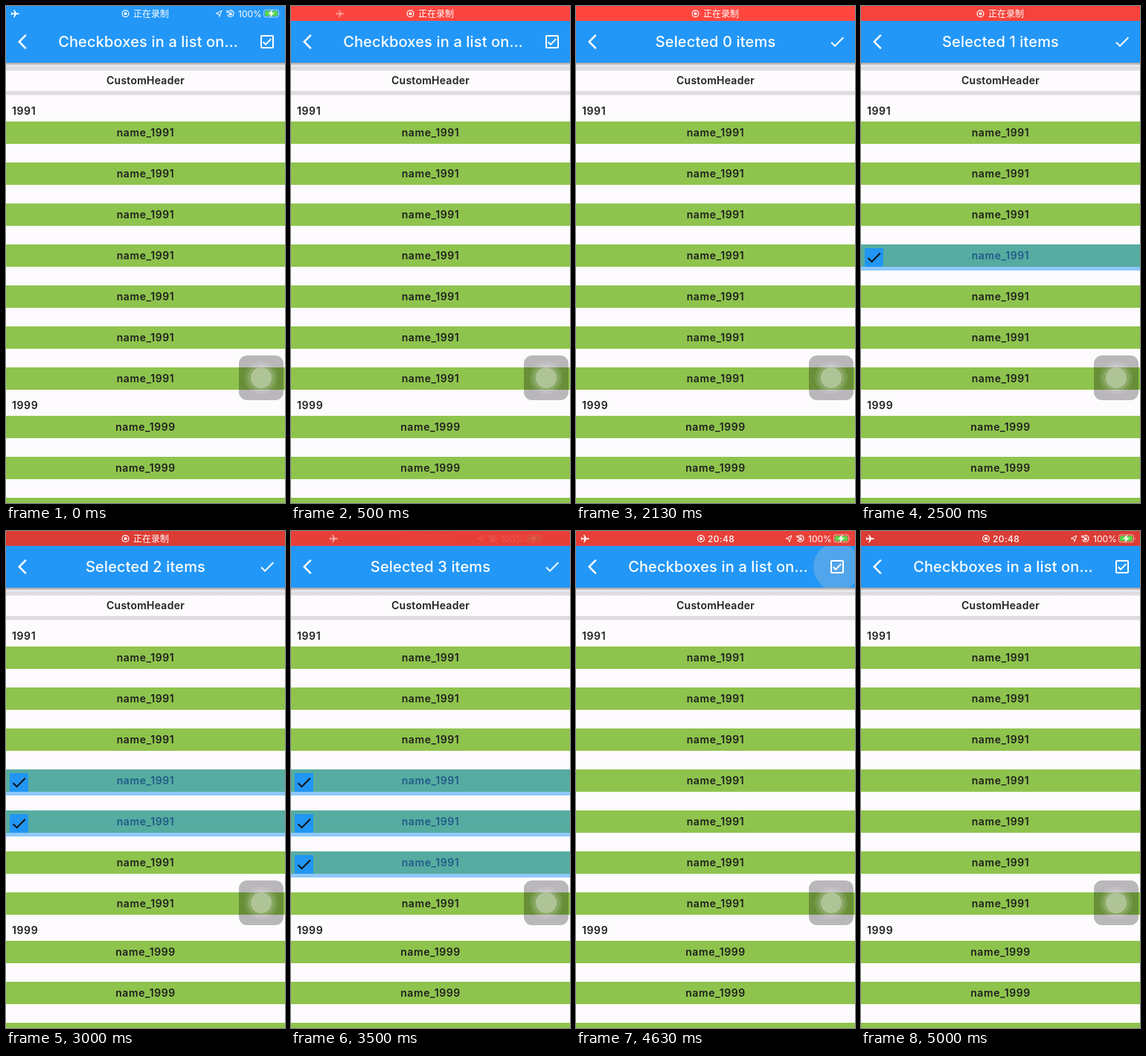
Recreate the animation shown at these times as an HTML page. Size 375x667 px, loop 5120 ms.

```html
<!DOCTYPE html>
<html lang="en">
<head>
<meta charset="utf-8">
<title>Checkbox list</title>
<style>
  html, body { margin: 0; width: 100%; height: 100%; overflow: hidden; }
  svg { display: block; width: 375px; height: 667px; font-family: Inter, "Noto Sans CJK SC", "Noto Sans CJK", sans-serif; }
  .title { font-size: 20px; font-weight: 500; letter-spacing: .15px; fill: #fff; text-anchor: middle; }
  .bold { font-size: 14px; font-weight: 600; letter-spacing: .25px; fill: #1f1f1f; }
  .mid { text-anchor: middle; }
  .num { letter-spacing: .6px; }
  .bar { font-size: 12px; fill: #fff; }
  .line { fill: none; stroke: #fff; }
</style>
</head>
<body>
<svg viewBox="0 0 375 667">
  <defs>
    <path id="tick" d="M9 16.17 4.83 12l-1.42 1.41L9 19 21 7l-1.41-1.41z"/>
    <g id="rec"><circle r="4.4" class="line" stroke-width="1.2"/><circle r="2" fill="#fff"/></g>
    <linearGradient id="shade" x2="0" y2="1">
      <stop stop-color="#000" stop-opacity=".38"/>
      <stop offset="1" stop-color="#000" stop-opacity="0"/>
    </linearGradient>
    <clipPath id="appbar"><path d="M0 20h375v56H0z"/></clipPath>
  </defs>

  <rect width="375" height="667" fill="#fdfbfe"/>
  <path d="M0 81h375v5.5H0zM0 114h375v5.5H0z" fill="#dedcdf"/>
  <text class="bold mid" x="187.5" y="105">CustomHeader</text>
  <g id="list"></g>

  <g transform="translate(343 499)">
    <rect x="-30" y="-30" width="60" height="60" rx="11" fill="#000" fill-opacity=".27"/>
    <g fill="#fff">
      <circle r="22" fill-opacity=".1"/>
      <circle r="18" fill-opacity=".14"/>
      <circle r="14" fill-opacity=".32"/>
    </g>
  </g>

  <rect y="76" width="375" height="5" fill="url(#shade)"/>
  <rect width="375" height="76" fill="#2397f7"/>
  <circle id="ripple" cx="351" cy="48" fill="#c8c8c8" clip-path="url(#appbar)"/>
  <path transform="translate(16 36)" fill="#fff" d="M11.67 3.87 9.9 2.1 0 12l9.9 9.9 1.77-1.77L3.54 12z"/>
  <text id="title" class="title" y="55"></text>
  <use id="done" href="#tick" x="339" y="36" fill="#fff"/>
  <g id="box" transform="translate(339 36)">
    <rect x="4" y="4" width="16" height="16" rx="1" class="line" stroke-width="2"/>
    <path fill="#fff" d="M17.99 9l-1.41-1.42-6.59 6.59-2.58-2.57-1.42 1.41 4 3.99z"/>
  </g>

  <rect id="status" width="375" height="20"/>
  <g id="recording">
    <use href="#rec" x="160.5" y="10.3"/>
    <text class="bar" x="171" y="14.6">正在录制</text>
  </g>
  <g id="clock">
    <use href="#rec" x="168" y="10.3"/>
    <text class="bar" x="177" y="14.5" font-weight="500" letter-spacing=".4">20:48</text>
  </g>
  <g id="plane">
    <path transform="translate(12.3 10.3) rotate(90) scale(.56) translate(-11.5 -12)" fill="#fff"
      d="M21 16v-2l-8-5V3.5c0-.83-.67-1.5-1.5-1.5S10 2.67 10 3.5V9l-8 5v2l8-2.5V19l-2 1.5V22l3.5-1 3.5 1v-1.5L13 19v-5.5l8 2.5z"/>
  </g>
  <g id="icons">
    <path class="line" d="M282.3 10.2 290 6l-3.2 8.4-1-4z" stroke-linejoin="round"/>
    <path class="line" d="M298 7.7a4.4 4.4 0 1 1-.5 3.6M297 5.5v3h3" stroke-width="1.1"/>
    <path d="M299.6 9.5h4v3h-4z" fill="#fff"/>
    <path class="line" d="M300.5 9.5v-1a1.1 1.1 0 0 1 2.2 0v1" stroke-width=".8"/>
    <text class="bar" x="312" y="14.5">100%</text>
    <rect x="346.5" y="5" width="20" height="10" rx="2.5" class="line" stroke-opacity=".6"/>
    <rect x="348" y="6.5" width="17" height="7" rx="1.2" fill="#5bd34b"/>
    <path d="M368 8.3q1.6 1.7 0 3.4z" fill="#fff" fill-opacity=".6"/>
    <path d="M358.5 4.5 352 10.8h3.8l-1.4 4.9 6.4-6.7h-3.7z" fill="#fff"/>
  </g>
</svg>
<script>
const LOOP = 5120, STEP = LOOP / 41;
const TAPS = [980, 4400];                 // toolbar button presses
const PICKS = [2380, 2880, 3380, 3630];   // rows four to seven
const $ = id => document.getElementById(id);
const clamp = v => Math.max(0, Math.min(1, v));
const ramp = (t, from, to) => clamp((t - from) / (to - from));
const mix = (a, b, k) => a.map((v, i) => Math.round(v + (b[i] - v) * k));
const show = (el, alpha) => el.setAttribute("opacity", alpha);

const row = (y, year) => `<rect y="${y}" width="375" height="30" fill="#8ec44d"/>
  <text class="bold mid num" x="187.5" y="${y + 20}">name_${year}</text>`;
const year = (y, label) => `<text class="bold num" x="8" y="${y}">${label}</text>`;
const mark = (_, i) => {
  const y = 320 + 55 * i;
  return `<g class="mark"><rect y="${y}" width="375" height="35" fill="#2196f3" fill-opacity=".5"/>
    <rect x="5" y="${y + 5}" width="25" height="25" fill="#2196f3"/>
    <use href="#tick" x="5.5" y="${y + 5.5}" fill="#111"/></g>`;
};
$("list").innerHTML = year(146, 1991) + year(541, 1999)
  + [0, 1, 2, 3, 4, 5, 6].map(i => row(155 + 55 * i, 1991)).join("")
  + [0, 1, 2].map(i => row(550 + 55 * i, 1999)).join("")
  + PICKS.map(mark).join("");
const marks = document.querySelectorAll(".mark");

function drawStatus(t) {
  const pulse = (1 - Math.cos((t - 1250) / 1875 * 2 * Math.PI)) / 2;
  const red = mix([219, 60, 53], [255, 70, 63], pulse);
  $("status").setAttribute("fill", `rgb(${mix([35, 151, 247], red, ramp(t, 0, 300))})`);

  const back = ramp(t, 3300, 3700);
  const away = ramp(t, 130, 740) * (1 - back);
  $("plane").setAttribute("transform", `translate(${away * 89} 0)`);
  show($("plane"), clamp(1.2 - away * 1.2));
  $("icons").setAttribute("transform", `translate(${-away * 60} 0)`);
  show($("icons"), clamp(1 - away * 1.7));
  show($("recording"), clamp(1 - back * 2));
  show($("clock"), clamp(back * 2 - 1));
}

function draw(t) {
  const selecting = t >= TAPS[0] + 140 && t < TAPS[1] + 140;
  const count = selecting ? PICKS.filter(p => t >= p).length : 0;
  marks.forEach((m, i) => show(m, +(i < count)));

  $("title").textContent = selecting ? `Selected ${count} items` : "Checkboxes in a list on…";
  $("title").setAttribute("x", selecting ? 187.5 : 191);
  show($("done"), +selecting);
  show($("box"), +!selecting);

  const age = t - (t < TAPS[1] ? TAPS[0] : TAPS[1]);
  $("ripple").setAttribute("r", 10 + 25 * ramp(age, 0, 250));
  show($("ripple"), age < 0 ? 0 : .28 * (1 - ramp(age, 300, 590)));
  drawStatus(t);
}

const start = performance.now();
function tick() {
  const t = (performance.now() - start) % LOOP;
  draw(Math.floor(t / STEP) * STEP);
  requestAnimationFrame(tick);
}
tick();
</script>
</body>
</html>
```
